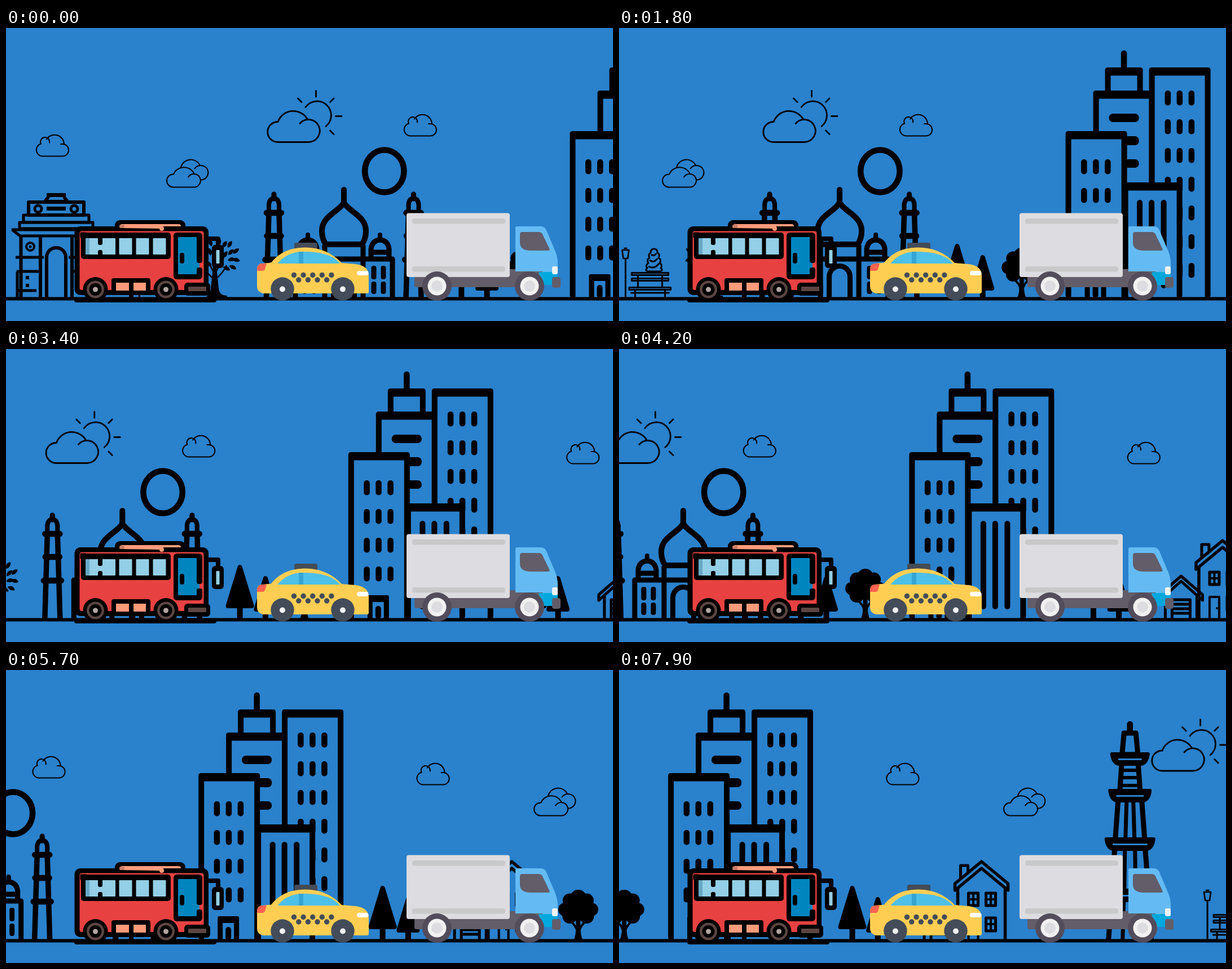
An HTML page for the animation above (8000 ms loop, 1076 by 520 pixels).

```html
<!DOCTYPE html>
<html lang="en">
<head>
<meta charset="utf-8">
<title>City traffic</title>
<style>
html, body { margin: 0; width: 100%; height: 100%; overflow: hidden; background: #2a81cc; }
svg { display: block; width: 1076px; height: 520px; }
</style>
</head>
<body>
<svg id="stage" viewBox="0 0 1076 520"></svg>
<script>
const SKY = '#2a81cc', LOOP = 8000, STEP = 100, SPEED = 0.1155;

// Drawing helpers, all returning SVG markup
const rect = (x, y, w, h, r = 0, fill = '#000') =>
  `<rect x="${x}" y="${y}" width="${w}" height="${h}" rx="${r}" fill="${fill}"/>`;
const disc = (x, y, r, fill = '#000') => `<circle cx="${x}" cy="${y}" r="${r}" fill="${fill}"/>`;
const shape = (d, fill = '#000') => `<path d="${d}" fill="${fill}"/>`;
const line = (d, w, fill = 'none', cap = 'butt') =>
  `<path d="${d}" fill="${fill}" stroke="#000" stroke-width="${w}" stroke-linecap="${cap}" stroke-linejoin="round"/>`;
const round = (d, w) => line(d, w, 'none', 'round');
const at = (x, y, s) => `<g transform="translate(${x} ${y})">${s}</g>`;
const flip = s => `<g transform="scale(-1 1)">${s}</g>`;
const both = s => s + flip(s);
const each = (list, fn) => list.map(fn).join('');

// Sky
const cloud = (x, y) => at(x, y, round(
  'M12 38H46.5A10.8 10.8 0 0 0 48.5 16.5H44M50 16.5A16.8 16.8 0 0 0 19 8' +
  'M24 14A8 8 0 1 0 9 16A11.2 11.2 0 0 0 12 38', 2));

const twinCloud = (x, y) => at(x, y, round(
  'M12 49H49A11.8 11.8 0 1 0 39 31M49 24A20 20 0 0 0 13 26A11.5 11.5 0 0 0 12 49' +
  'M26 13.5A18.2 18.2 0 0 1 60 10.5A12.8 12.8 0 1 1 62 36M60 10.5Q54 11 50.5 16', 2));

const sunCloud = (x, y) => at(x, y, round(
  'M18.5 93H73.5A20 20 0 1 0 58 60M71.5 52.5A29 29 0 0 0 19 57A18 18 0 0 0 18.5 93' +
  'M68 31A25 25 0 1 1 104 65M86.5 2V12.5M111.5 22L118 15.5M121.5 47H132' +
  'M111.5 72.5L118 79M54.5 15.5L61 22', 2.8));

// Greenery and street furniture
const cone = (x, top, half, base) => at(x, 0,
  line(`M0 ${top + 5}L${half - 4} ${base - 4}H${4 - half}Z`, 8, '#000') +
  rect(-5, base - 2, 10, 480 - base));

const roundTree = x => at(x, 0,
  disc(0, 405, 15) + disc(0, 425, 20) +
  both(disc(15, 409, 12.5) + disc(23.5, 425, 12) + disc(15, 437, 13) + line('M2 464Q3 454 14 446', 4)) +
  shape('M-8 479Q-3 470 -4 444H4Q3 470 8 479Z'));

const leaf = ([x, y, a]) =>
  `<path transform="translate(${x} ${y}) rotate(${a})" d="M-7 0Q0 -8 7 0Q0 6 -7 0Z"/>`;

const leafyTree = x => at(x, 0,
  both(each([[8, 381, -70], [18, 384, -60], [27, 384, -60], [38, 396, -40], [29, 398, -45],
    [19, 402, -60], [30, 411, -10], [38, 412, 10], [32, 425, 25], [21, 427, 25],
    [9, 397, -75], [11, 419, -40]], leaf) +
    line('M1 446Q14 436 21 421M1 436Q8 420 16 408', 2.5)) +
  shape('M-22 480Q-7 476 -7 462L-3 425H3L7 462Q8 475 22 475V480Z'));

const curlyTree = x => at(x, 0,
  both(line('M0 392Q6 392 6 399Q11 401 8 408Q14 411 10 417Q16 421 12 426Q17 431 10 432H0', 3)) +
  line('M-5 402Q0 406 4 400M-8 412Q0 418 6 409M-10 423Q0 429 9 418', 3));

const bench = x => at(x, 0,
  line('M6 434.5H71V438.5H6ZM6 444.5H71V448.5H6ZM1.5 460.5H75V464.5H1.5Z', 3) +
  line('M17 438V460M60 438V460M4 470H73M12 464V479M65 464V479', 3));

const lamp = x => at(x, 0,
  line('M-6 394H6L4 409H-4ZM-3 391H3', 2.6) + line('M0 410V479', 3));

const park = x => lamp(x) + curlyTree(x + 50.5) + bench(x + 5);

// Landmarks
const gate = x => at(x, 0,
  shape('M-17 293H17V299L23 307H-23L-17 299Z') + shape('M-11 300H11L14 305H-14Z', SKY) +
  line('M-49 309H49V332H-49Z', 6) + rect(-17, 317, 34, 7) +
  line('M-58 332H58V345H-58Z', 5) + line('M-65 345H65V356H-65Z', 5) +
  both(disc(32, 321, 8.5) + disc(32, 321, 3.5, SKY) +
    line('M0 358H79M0 369H64L78 358', 5) +
    line('M62.5 369V479M28 369V479', 6) +
    line('M22 407H72M28 432H70M69 432V479M35 466H69', 5) +
    `<circle cx="46" cy="388" r="7" fill="none" stroke="#000" stroke-width="4"/>` + disc(46, 388, 2.5) +
    rect(48, 440, 6, 6) + rect(48, 454, 6, 6)) +
  line('M-17 479V407A17 17 0 0 1 17 407V479', 6));

const minaret = x => at(x, 0,
  round('M0 295V303', 9) +
  line('M-9 325V313Q-8 303 0 302Q8 303 9 313V325', 8) +
  line('M-9 328L-13.5 479M9 328L13.5 479', 9.5) +
  round('M-13 328H13M-12.5 369H12.5M-15.5 411H15.5', 10.5));

const smallDome = x => at(x, 0,
  round('M0 367V374', 8) +
  line('M-16 407V392Q-14 377 0 376Q14 377 16 392V407M-16 398H16', 9));

const panes = x => each([x, x + 17], v => rect(v - 4.5, 422, 9, 24, 4) + rect(v - 4.5, 450, 9, 22, 4));

const palace = x => minaret(x - 124) + minaret(x + 123.5) + at(x, 0,
  smallDome(-64) + smallDome(64) +
  round('M0 287V312', 10) +
  line('M0 310C-9 326 -39 334 -39 360Q-39 374 -32 384H32Q39 374 39 360C39 334 9 326 0 310Z', 10) +
  both(line('M34 385V479M0 410H86V479', 9)) + panes(53) + panes(-70) +
  line('M-18.5 479V442A18.5 19.5 0 0 1 18.5 442V479', 9));

const block = (x, y, w) =>
  rect(x, y, w, 479 - y, 4.5) + rect(x + 10, y + 14.5, w - 20, 466 - y, 0, SKY);
const slots = (xs, top, rows) =>
  each(xs, x => each([...Array(rows).keys()], i => rect(x - 5, top + i * 51, 10.5, 26.5, 5)));

const towers = () => at(-0.5, 0,
  round('M1103.5 45V75', 10.5) +
  block(1070, 70, 67) + block(1049, 111, 109) +
  rect(1077, 152, 53, 15, 7) + rect(1077, 192, 53, 16, 7) + rect(1077, 233, 53, 15, 7) +
  block(1148, 70, 109) + slots([1181, 1202, 1223], 111, 7) +
  block(1101, 274, 106) + each([1131.5, 1152.5, 1174], x => rect(x - 5, 305, 10, 157, 5)) +
  block(1000, 183, 109) + slots([1032.5, 1053.5, 1074.5], 233, 4) +
  rect(1034, 437, 38, 42, 3) + rect(1043, 449, 20, 30, 0, SKY) + rect(1048, 456, 10, 23, 5));

const frame = (x, y, w, h) => line(`M${x} ${y}h${w}v${h}h${-w}z`, 5);

const houses = () =>
  at(1481.5, 0,
    line('M0 403L38 436V446L0 412L-38 446V436Z', 5, SKY) +
    line('M-28 438V479M28 438V479', 5) +
    line('M-16 479V445H16V479M-16 453H16M-16 461H16M-16 469H16', 5)) +
  at(1555, 0,
    line('M-37 372V347H-24V360', 5) +
    line('M0 340L47 379V391L0 352L-47 391V379Z', 5.5, SKY) +
    line('M-42 386V479M42 386V479', 5.5) +
    frame(-23, 396, 17, 22) + frame(8, 396, 17, 22) + frame(8, 440, 17, 23) +
    line('M-23 479V440H-6V479M16.5 396V418M8 407H25M-14.5 396V418M-23 407H-6M16.5 440V463M8 451H25', 4) +
    disc(-10, 460, 2));

const bowl = (y, half) =>
  shape(`M${-half} ${y + 3}Q${-half} ${y} ${3 - half} ${y}H${half - 3}Q${half} ${y} ${half} ${y + 3}` +
    `Q${half - 2} ${y + 21} ${half - 14} ${y + 24}H${14 - half}Q${2 - half} ${y + 21} ${-half} ${y + 3}Z`) +
  rect(14 - half, y + 11, 2 * half - 28, 3, 1, SKY);

const spire = x => at(x, 0,
  round('M0 96V110', 10.5) +
  line('M-10.5 112H10.5L14 150H-14Z', 9) +
  both(line('M14.5 165L18 215M21 232L26 300M27 318L33 392M33 408L38 479', 9) +
    line('M6 234L8 300M9 318L10 392M11 408L13 479', 7)) +
  line('M-15 178H15M-16 191H16M-17 205H17', 6) +
  bowl(146, 35) + bowl(211, 38.5) + bowl(297, 45) + bowl(388, 47));

// Vehicles
const bus = () => {
  const red = '#e84142', peach = '#ff9b7a', glass = '#93cfe6', blue = '#0085bf', brown = '#5b4543';
  const wheel = x => disc(x, 464, 22) + disc(x, 464, 15.5, brown) + disc(x, 464, 11) + disc(x, 464, 4.5, '#b1a6a3');
  return rect(121, 478, 252, 9, 4) +
    line('M350 374H376V390', 8) + rect(365, 385, 21, 41, 6) + rect(372.5, 394, 6, 24, 1, glass) +
    rect(193, 341, 125, 24, 9) +
    rect(121.5, 352, 237.5, 122, 10) + rect(130.5, 360.5, 220, 104.5, 4, red) +
    shape('M202 355V352Q202 348 206 348H306Q310 348 310 352H280L272 356Z', peach) +
    rect(201, 349, 9, 6, 2, '#c97d65') + shape('M272 360L280 352H311V360Z') +
    rect(272, 352, 8, 8, 4, peach) +
    round('M133 371V364H141', 3) +
    rect(133, 363, 159, 47, 5) +
    rect(141, 373, 53, 29, 1, glass) + rect(141, 373, 7, 29, 1, '#68a9c6') +
    rect(163, 371, 8, 14, 3) + rect(163, 394, 8, 12, 3) +
    each([200.5, 230.5, 260.5], x => rect(x, 373, 23, 29, 1, glass)) +
    rect(297, 363, 51, 83, 6) + rect(305, 371, 33, 66, 1, blue) +
    rect(338, 413, 5, 16, 0, blue) + rect(343, 413, 5, 16, 0, red) +
    rect(338, 405, 10, 12, 4) + rect(338, 425, 10, 15, 4) +
    rect(308, 399, 8, 19, 4) +
    rect(187, 444, 69, 30, 4) + rect(195, 452, 23, 14, 0, peach) + rect(226, 452, 22, 14, 0, peach) +
    rect(218, 474, 8, 6) +
    wheel(158.5) + wheel(283.5) +
    rect(316, 452, 46, 23, 6) + rect(323, 459, 32, 8, 1, brown);
};

const taxi = () => {
  const dark = '#434c58', glass = '#4dc0ea';
  const wheel = x => disc(x, 463, 20.7, dark) + disc(x, 463.5, 5, '#f1f4f7');
  return rect(511, 381, 41, 14, 3, dark) +
    shape('M445 428Q445 419 453 418L470 416.5Q491 390 529 389.5Q569 389 595 417L620 419Q643 422 643 440V468Q643 471 640 471H455Q445 468 445 459Z', '#fece53') +
    shape('M481 418Q497 399 521 397H533Q560 397 579 407Q586 411 592 418Z', glass) +
    rect(519, 397, 8, 21, 0, '#35a5d3') +
    shape('M445 431V427Q446 419 453 418H462L459 428Q458 431 455 431Z', '#fc6250') +
    rect(622, 431, 20.5, 8, 4, '#fff') +
    each([0, 1, 2, 3, 4], i => disc(510.5 + i * 16.6, 438.5, 4.7, dark) +
      (i < 4 ? disc(518.8 + i * 16.6, 447, 4.7, dark) : '')) +
    wheel(490) + wheel(597);
};

const truck = () => {
  const grey = '#625d69', box = '#dddce0', band = '#c9c9cb';
  const wheel = x => disc(x, 458, 26, '#534c5b') + disc(x, 458, 16.5, '#f1f1f1') + disc(x, 458, 10, box);
  return rect(724, 428, 190, 32, 3, grey) +
    shape('M903 355Q903 352 906 352H948Q955 352 958 359L974 397Q978 407 978 418V436H903Z', '#64bbf4') +
    rect(902, 432, 50, 28, 2, grey) +
    shape('M944 433H978V444H970V456H950Z', '#00a8dd') +
    shape('M911 366Q911 362 915 362H944Q949 362 951 366L963 391Q965 395 961 395H928Q911 394 911 381Z', grey) +
    rect(968, 423, 10, 14, 3, '#f3f3f3') +
    rect(968, 442, 15, 19, 4, grey) +
    rect(710, 328.5, 183, 113.5, 4, box) +
    rect(720, 338, 165, 9.5, 4, band) + rect(720, 423, 165, 9.5, 4, band) +
    wheel(764) + wheel(928);
};

const city = [
  cloud(53, 189.5), cloud(705, 153.5), cloud(1386, 165.5),
  twinCloud(284, 233.5), twinCloud(1593.5, 209.5),
  gate(89), park(219.5), leafyTree(370), palace(599),
  '<ellipse cx="670.8" cy="254" rx="34.7" ry="37.5" fill="none" stroke="#000" stroke-width="10.5"/>',
  sunCloud(463, 109.5),
  cone(807.3, 382, 25, 460), cone(852.6, 402, 20.5, 466), roundTree(921.7), towers(),
  cone(1326, 382, 25, 460), cone(1371.2, 402, 20.5, 466), houses(), roundTree(1672.7),
  spire(1818.2), sunCloud(1856.5, 86), park(1955.5)
].join('');

const stage = document.getElementById('stage');
stage.innerHTML = rect(0, 0, 1076, 520, 0, SKY) + `<g id="city">${city}</g>` +
  rect(0, 477.5, 1076, 6) + bus() + taxi() + truck();
const layer = document.getElementById('city');

// The scenery advances in whole steps
function draw(ms) {
  const t = Math.floor(ms % LOOP / STEP) * STEP;
  layer.setAttribute('transform', `translate(${(-t * SPEED).toFixed(2)} 0)`);
}

const start = performance.now();
function tick() {
  draw(performance.now() - start);
  requestAnimationFrame(tick);
}
draw(0);
requestAnimationFrame(tick);
</script>
</body>
</html>
```
